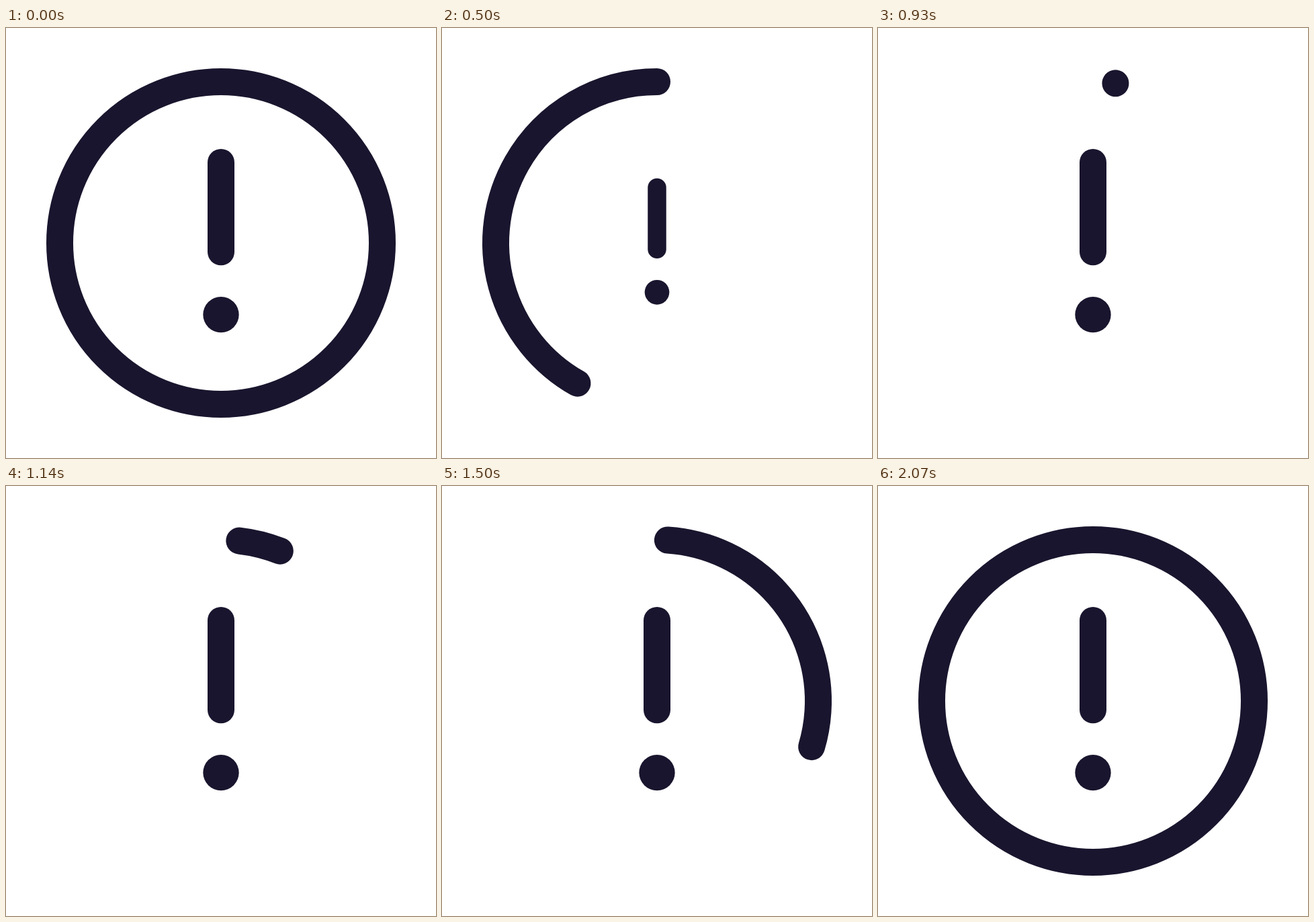
An HTML page with a canvas for the animation above (2430 ms loop, 640 px wide and 640 px high).

```html
<!DOCTYPE html>
<html lang="en">
<head>
<meta charset="utf-8">
<title>Alert icon</title>
<style>
html, body { margin: 0; width: 100%; height: 100%; overflow: hidden; background: #fff; }
canvas { display: block; width: 100vmin; height: 100vmin; }
</style>
</head>
<body>
<canvas id="stage" width="640" height="640"></canvas>
<script>
const ctx = document.getElementById('stage').getContext('2d');
const INK = '#1a152e';
const LOOP = 2430, RATE = 14, LAST = 29;
const MID = 320, RADIUS = 240;

const clamp = (v, lo = 0, hi = 1) => Math.min(hi, Math.max(lo, v));
const span = (v, from, to) => clamp((v - from) / (to - from));

// Symmetric cubic-bezier(h, 0, 1 - h, 1), solved by bisection.
function ease(x, h) {
  let lo = 0, hi = 1;
  for (let n = 0; n < 30; n++) {
    const t = (lo + hi) / 2, u = 1 - t;
    const at = 3 * h * t * u * u + 3 * (1 - h) * t * t * u + t * t * t;
    if (at < x) lo = t; else hi = t;
  }
  return lo * lo * (3 - 2 * lo);
}

// Visible part of the ring in degrees, clockwise from the top.
function ringSpan(step) {
  if (step <= 12.37) return [360 * ease(span(step, 0, 12.37), 0.2), 360];
  const left = LAST - step;
  const end = 8 + 352 * Math.pow(span(step, 13.4, 28.5), 1.855);
  const start = 0.425 * left + 0.006 * left * left;
  return [Math.min(start, end), end];
}

function markScale(step) {
  const dip = step < 5.5
    ? ease(span(step, 0, 5.5), 0.167)
    : 1 - ease(span(step, 5.5, 11.27), 0.167);
  return 1 - 0.4 * dip;
}

function drawRing(step) {
  const [from, to] = ringSpan(step);
  const rad = deg => (deg - 90) * Math.PI / 180;
  ctx.beginPath();
  // A tiny minimum length keeps the round caps visible.
  ctx.arc(MID, MID, RADIUS, rad(from), rad(Math.max(to, from + 0.02)));
  ctx.stroke();
}

function drawMark(scale) {
  ctx.save();
  ctx.translate(MID, MID);
  ctx.scale(scale, scale);
  ctx.beginPath();
  ctx.moveTo(0, -120);
  ctx.lineTo(0, 40 / 3);
  ctx.stroke();
  ctx.beginPath();
  ctx.arc(0, 320 / 3, 80 / 3, 0, 2 * Math.PI);
  ctx.fill();
  ctx.restore();
}

function draw(time) {
  const tick = Math.floor(time / 10) * 10 + 5;
  const step = Math.min(LAST, Math.floor(tick * RATE / 1000));
  ctx.fillStyle = '#fff';
  ctx.fillRect(0, 0, 640, 640);
  ctx.fillStyle = ctx.strokeStyle = INK;
  ctx.lineWidth = 40;
  ctx.lineCap = 'round';
  drawRing(step);
  drawMark(markScale(step));
}

const began = performance.now();
function loop() {
  draw((performance.now() - began) % LOOP);
  requestAnimationFrame(loop);
}
loop();
</script>
</body>
</html>
```
